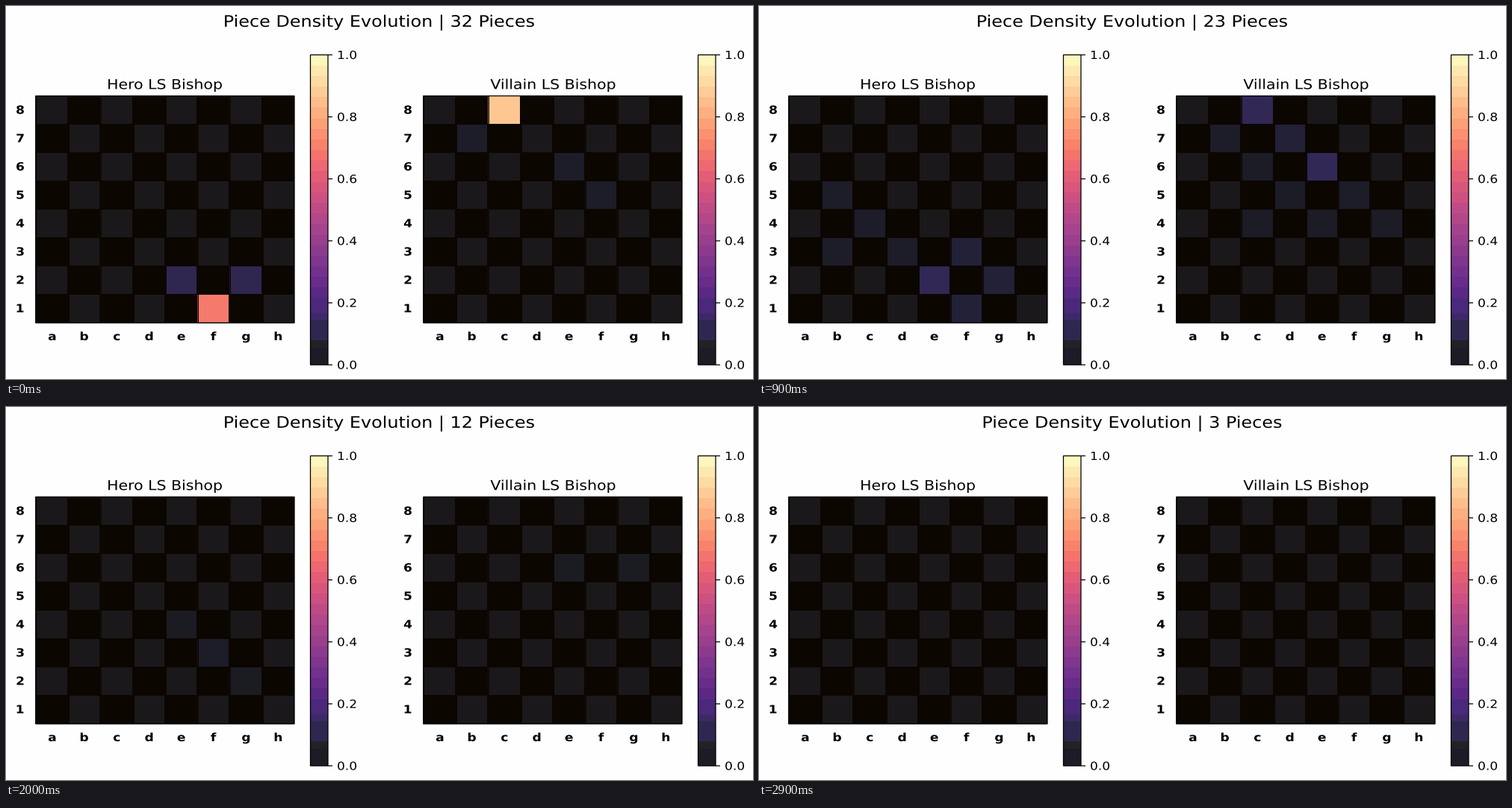
A matplotlib script that plays this animation: 1000x500 px, repeating every 3 s.

```python
import matplotlib.pyplot as plt
import numpy as np
from matplotlib.animation import FuncAnimation
from matplotlib.patches import PathPatch, Rectangle
from matplotlib.textpath import TextPath
from matplotlib.transforms import Affine2D

W, H = 1000, 500
ASPECT = 1.129  # the whole picture, lettering included, is wider than tall
PT = 1.512      # pixels per point, vertically
BOARD_TOP, CELL_W, CELL_H = 121, 43.25, 38
BAR_TOP, BAR_BOTTOM, BAR_W = 65.5, 481, 23.5
DARK = np.array([11, 6, 0]) / 255
LIGHT = np.array([26, 24, 26]) / 255
FILES = "abcdefgh"

# Densities at a few piece counts; values between are interpolated.
HERO = {
    32: "f1 .69 e2 .11 g2 .11",
    27: "f1 .2 e2 .2 d3 .11 g2 .11 c4 .035 b3 .035 f3 .03",
    23: "e2 .12 g2 .065 f1 .065 f3 .065 d3 .035 b3 .035 c4 .035 b5 .035",
    20: "g2 .05 c4 .04 b3 .04 d3 .04 f3 .04 e2 .04 f1 .04",
    15: "f3 .035 g2 .035",
    9: "f3 .035 e4 .035",
    3: "",
}
VILLAIN = {
    32: "c8 .87 b7 .035 e6 .035 f5 .035",
    27: "c8 .33 e6 .12 d7 .065 b7 .065 f5 .035 g4 .035 f3 .035 e2 .03",
    23: "c8 .12 e6 .12 d7 .065 b7 .035 f5 .035 d5 .03 c6 .03 c4 .03 e4 .03 g4 .03",
    20: "c8 .04 b7 .04 d7 .04 c6 .04 e6 .04 f5 .04",
    15: "g6 .035",
    9: "e6 .035",
    3: "",
}

fig = plt.figure(figsize=(W / 100, H / 100), dpi=100, facecolor="#fefefe")
ax = fig.add_axes([0, 0, 1, 1])
ax.set(xlim=(0, W), ylim=(H, 0))
ax.axis("off")


def shade(value):
    """Magma at 90 % opacity over white."""
    if value < 0.015:
        return LIGHT
    return 0.9 * np.array(plt.cm.magma(value)[:3]) + 0.1


def text_path(text, x, baseline, points, bold=False, centered=True):
    prop = {"family": "DejaVu Sans", "weight": "bold" if bold else "normal"}
    path = TextPath((0, 0), text, size=points * PT, prop=prop)
    if centered:
        box = path.get_extents()
        x -= ASPECT * (box.x0 + box.x1) / 2
    return Affine2D().scale(ASPECT, -1).translate(x, baseline).transform_path(path)


def label(*args, **kwargs):
    patch = PathPatch(text_path(*args, **kwargs), fc="black", lw=0)
    return ax.add_patch(patch)


def box(x0, y0, x1, y1, color):
    patch = Rectangle((x0, y0), x1 - x0, y1 - y0, fc=color, lw=0, antialiased=False)
    return ax.add_patch(patch)


def frame(x, y, w, h):
    ax.add_patch(Rectangle((x, y), w, h, fill=False, ec="black", lw=0.9,
                           snap=False))


def densities(keys):
    """Return a function giving {square: density} for a piece count."""
    tables = {}
    for count, spec in keys.items():
        words = spec.split()
        tables[count] = dict(zip(words[::2], map(float, words[1::2])))
    counts = sorted(tables)
    squares = set().union(*tables.values())
    tracks = {s: [tables[c].get(s, 0) for c in counts] for s in squares}
    return lambda n: {s: np.interp(n, counts, t) for s, t in tracks.items()}


class Board:
    def __init__(self, left, title, keys):
        self.density = densities(keys)
        self.cells = {}
        box(left, BOARD_TOP, left + 8 * CELL_W, BOARD_TOP + 8 * CELL_H, DARK)
        for i, name in enumerate(FILES):
            x = left + i * CELL_W
            label(name, x + CELL_W / 2, 448, 10, bold=True)
            for rank in range(1, 9):
                if (i + rank) % 2:
                    continue
                y = BOARD_TOP + (8 - rank) * CELL_H
                x0, x1 = np.ceil(x + (1.5 if i else 1)), np.floor(x + CELL_W - 0.75)
                cell = box(x0, y, x1, y + CELL_H - 1, LIGHT)
                seam = None
                if name in "cfg":
                    seam = box(x0 - 2, y, x0 - 1, y + CELL_H - 1, LIGHT)
                self.cells[f"{name}{rank}"] = cell, seam
        for rank in range(1, 9):
            y = BOARD_TOP + (8.5 - rank) * CELL_H
            label(str(rank), left - 21, y + 4.5, 10, bold=True)
        frame(left - 0.3, BOARD_TOP - 0.5, 8 * CELL_W + 0.3, 8 * CELL_H + 0.3)
        label(title, left + 4 * CELL_W, 111.3, 12)

    def update(self, pieces):
        density = self.density(pieces)
        for square, (cell, seam) in self.cells.items():
            color = shade(density.get(square, 0))
            cell.set_facecolor(color)
            if seam:
                seam.set_facecolor((color + DARK) / 2)


def bar_y(value):
    return BAR_BOTTOM + (BAR_TOP - BAR_BOTTOM) * value


def color_bar(left):
    right = left + BAR_W
    edges = [0, 0.055, 0.08, 0.145, 0.167, *np.linspace(0.215, 1, 24)]
    for k, (low, high) in enumerate(zip(edges, edges[1:])):
        color = "#222226" if k == 1 else shade(max(0.02, (low + high) / 2))
        box(left, bar_y(high), right, bar_y(low), color)
    frame(left, BAR_TOP, BAR_W, BAR_BOTTOM - BAR_TOP)
    for value in np.linspace(0, 1, 6):
        y = bar_y(value)
        ax.plot([right, right + 6], [y, y], color="black", lw=0.9,
                solid_capstyle="butt", snap=False)
        label(f"{value:.1f}", right + 12, y + 5.5, 10, centered=False)


boards = [Board(40, "Hero LS Bishop", HERO),
          Board(559, "Villain LS Bishop", VILLAIN)]
color_bar(407.5)
color_bar(926.5)


def title_path(pieces):
    return text_path(f"Piece Density Evolution | {pieces} Pieces", 500, 27.8, 14)


title = ax.add_patch(PathPatch(title_path(32), fc="black", lw=0))


def update(i):
    pieces = 32 - i
    title.set_path(title_path(pieces))
    for board in boards:
        board.update(pieces)
    return []


anim = FuncAnimation(fig, update, frames=30, interval=100, repeat=True,
                     repeat_delay=0)
plt.show()
```
